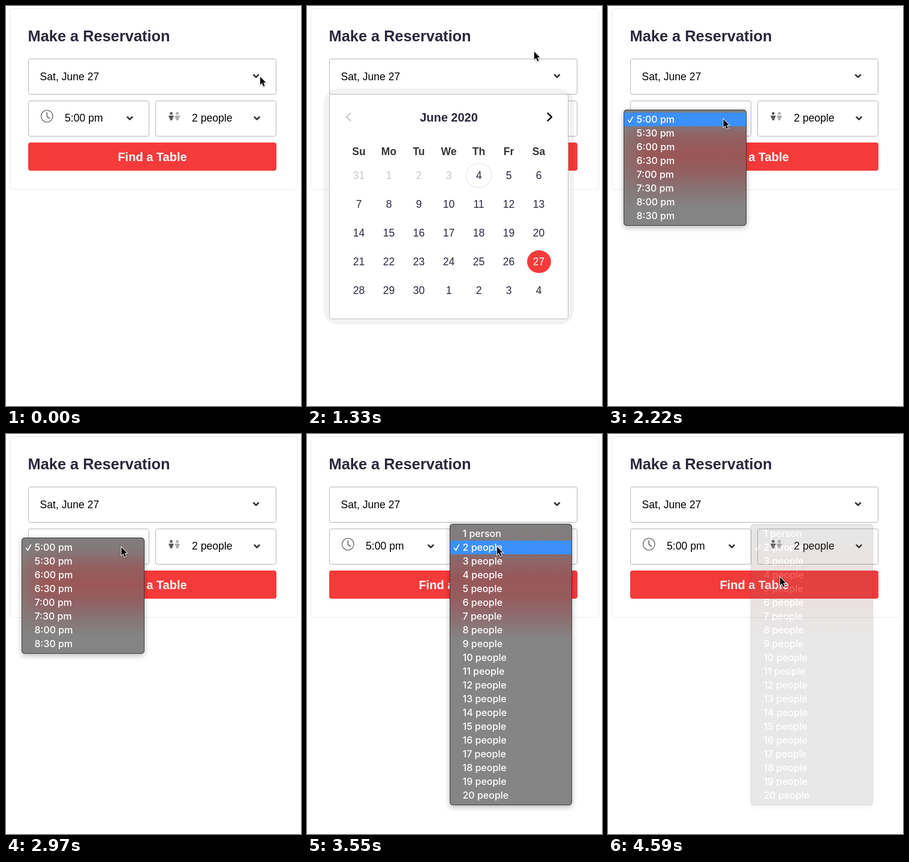
Animation of 492 by 668 pixels, one loop 4.74 s. Source, as an HTML page:

```html
<!DOCTYPE html>
<html lang="en">
<head>
<meta charset="utf-8">
<title>Reservation form</title>
<style>
  html, body { margin: 0; width: 100%; height: 100%; overflow: hidden; background: #fff; }
  svg { display: block; font-family: "Liberation Sans", Arial, sans-serif; }
  text { white-space: pre; }
  .bold { font-weight: 700; }
  .mid { text-anchor: middle; }
  .field { fill: #fff; stroke: #b4b4b4; }
  .line { fill: none; stroke-linecap: round; stroke-linejoin: round; }
  .menu text { font: 500 16px Inter, Roboto, sans-serif; fill: #fff; }
  .panel { filter: drop-shadow(0 3px 5px rgba(0, 0, 0, .28)); }
  .cursor { filter: drop-shadow(0 1px 1px rgba(0, 0, 0, .3)); }
</style>
</head>
<body>
<svg id="stage" width="492" height="668" viewBox="0 0 492 668">
  <defs>
    <linearGradient id="timeGlass" x1="0" y1="173" x2="0" y2="367" gradientUnits="userSpaceOnUse">
      <stop offset="0" stop-color="#7f7f7f"/>
      <stop offset=".12" stop-color="#847677"/>
      <stop offset=".25" stop-color="#935f60"/>
      <stop offset=".4" stop-color="#9b5757"/>
      <stop offset=".54" stop-color="#935f60"/>
      <stop offset=".7" stop-color="#877576"/>
      <stop offset=".85" stop-color="#848484"/>
    </linearGradient>
    <linearGradient id="peopleGlass" x1="0" y1="150" x2="0" y2="620" gradientUnits="userSpaceOnUse">
      <stop offset="0" stop-color="#7f7f7f"/>
      <stop offset=".06" stop-color="#827b7b"/>
      <stop offset=".12" stop-color="#8c6868"/>
      <stop offset=".19" stop-color="#98585a"/>
      <stop offset=".26" stop-color="#975b5d"/>
      <stop offset=".33" stop-color="#8d6d6f"/>
      <stop offset=".41" stop-color="#858585"/>
    </linearGradient>
    <linearGradient id="edge">
      <stop offset="0" stop-color="#828282" stop-opacity=".6"/>
      <stop offset=".18" stop-color="#828282" stop-opacity="0"/>
    </linearGradient>
  </defs>
</svg>
<script>
const LOOP = 4740, INK = '#2a283c', RED = '#f53a3a', BLUE = '#3b90fd';
const stage = document.getElementById('stage');

function add(parent, tag, attrs = {}, text) {
  const el = document.createElementNS('http://www.w3.org/2000/svg', tag);
  for (const key in attrs) el.setAttribute(key, attrs[key]);
  if (text !== undefined) el.textContent = text;
  return parent.appendChild(el);
}
const rect = (p, x, y, width, height, rx, attrs) =>
  add(p, 'rect', { x, y, width, height, rx, ...attrs });
const label = (p, x, y, size, text, fill = '#000', cls = '') =>
  add(p, 'text', { x, y, 'font-size': size, fill, class: cls }, text);
const line = (p, d, stroke, width) =>
  add(p, 'path', { d, stroke, 'stroke-width': width, class: 'line' });

// Holds each value until the next time in the table.
function hold(el, prop, steps) {
  const frames = steps.map(([t, v]) => ({ offset: t / LOOP, [prop]: v, easing: 'step-end' }));
  frames.push({ offset: 1, [prop]: steps[steps.length - 1][1] });
  el.animate(frames, { duration: LOOP, iterations: Infinity });
}

function drawForm() {
  const form = add(stage, 'g');
  rect(form, 6.5, 4.5, 480, 302, 4, { fill: '#fff', stroke: '#ebebeb' });
  label(form, 36.5, 59, 25.4, 'Make a Reservation', INK, 'bold');
  rect(form, 37.5, 88.5, 413, 59, 3, { class: 'field' });
  rect(form, 37.5, 158.5, 201, 59, 3, { class: 'field' });
  rect(form, 249.5, 158.5, 201, 59, 3, { class: 'field' });
  label(form, 56.5, 124, 17.6, 'Sat, June 27');
  label(form, 98, 193, 17.6, '5:00 pm');
  label(form, 310, 193, 17.6, '2 people');
  for (const [x, y] of [[417, 117], [206.5, 187.5], [418.5, 187.5]])
    line(form, `M${x - 4} ${y - 2}l4 4 4-4`, '#333', 2.5);

  add(form, 'circle', { cx: 68.3, cy: 184, r: 9.8, fill: 'none', stroke: '#666', 'stroke-width': 1.3 });
  line(form, 'M68.3 178v6.5l4.2 3.2', '#666', 1.6);
  for (const [x, fill] of [[275.5, '#5c5c5c'], [285.7, '#adadad']]) {
    add(form, 'circle', { cx: x, cy: 179.4, r: 2.4, fill });
    add(form, 'path', { d: `M${x - 4} 183h8q.7 2-1.2 4l-1.3 4h-3l-1.3-4q-1.9-2-1.2-4z`, fill });
  }

  rect(form, 37, 228, 414, 47, 4, { fill: RED });
  label(form, 244, 259, 20, 'Find a Table', '#fff', 'bold mid');
}

function drawCalendar() {
  const cal = add(stage, 'g', { opacity: 0 });
  rect(cal, 28, 138, 417, 394, 24, { fill: '#000', opacity: .05 });
  rect(cal, 37.5, 147.5, 398, 375, 3, { fill: '#fff', stroke: '#bdbdbd' });
  label(cal, 236.5, 193, 20, 'June 2020', INK, 'bold mid');
  line(cal, 'M72.5 179l-6.5 6.3 6.5 6.3', '#ccc', 2.4);
  line(cal, 'M401.5 179l6.5 6.3-6.5 6.3', '#000', 2.4);
  add(cal, 'ellipse', { cx: 286.5, cy: 283, rx: 21.3, ry: 20.3, fill: '#fff', stroke: '#ebebeb', 'stroke-width': 1.6 });
  add(cal, 'ellipse', { cx: 387, cy: 427, rx: 20, ry: 19, fill: RED });

  const colX = i => 86.5 + 50 * (i % 7);
  ['Su', 'Mo', 'Tu', 'We', 'Th', 'Fr', 'Sa'].forEach((d, i) =>
    label(cal, colX(i), 249, 17.5, d, '#333', 'bold mid'));
  for (let i = 0; i < 35; i++) {
    const day = i === 0 ? 31 : i > 30 ? i - 30 : i;
    const fill = i < 4 ? '#c9c9cd' : i === 27 ? '#fff' : INK;
    label(cal, colX(i), 289 + 48 * Math.floor(i / 7), 17.5, day, fill, 'mid');
  }
  hold(cal, 'opacity', [[0, 0], [590, 1], [1630, 0]]);
}

function drawMenu(x, y, width, items, checked, glass) {
  const menu = add(stage, 'g', { class: 'menu', opacity: 0 });
  const height = items.length * 23 + 10;
  rect(menu, x, y, width, height, 5, { fill: `url(#${glass})`, class: 'panel' });
  if (glass === 'timeGlass') rect(menu, x, y, width, height, 5, { fill: 'url(#edge)' });
  const mark = rect(menu, x, y + 5 + 23 * checked, width, 23, 0, { fill: BLUE });
  rect(menu, x + .5, y + .5, width - 1, height - 1, 5, { fill: 'none', stroke: '#3c3c3c' });
  items.forEach((item, i) => add(menu, 'text', { x: x + 21.5, y: y + 22 + 23 * i }, item));
  line(menu, `M${x + 7.5} ${y + 17.5 + 23 * checked}l2.8 3.8 5-9.3`, '#fff', 1.6);
  return { menu, mark };
}

function drawTimes() {
  const items = Array.from({ length: 8 }, (_, i) => `${5 + (i >> 1)}:${i % 2 ? '30' : '00'} pm`);
  const { menu, mark } = drawMenu(26, 173, 205, items, 0, 'timeGlass');
  hold(menu, 'opacity', [[0, 0], [2220, 1], [3110, .19], [3260, 0]]);
  hold(mark, 'opacity', [[0, 1], [2970, 0]]);
}

function drawPeople() {
  const items = Array.from({ length: 20 }, (_, i) => `${i + 1} ${i ? 'people' : 'person'}`);
  const { menu, mark } = drawMenu(238, 150, 204, items, 1, 'peopleGlass');
  hold(menu, 'opacity', [[0, 0], [3550, 1], [4590, .19]]);
  hold(mark, 'opacity', [[0, 1], [4440, 0]]);
  hold(mark, 'transform', [[0, 'translateY(0px)'], [3990, 'translateY(23px)']]);
}

function drawCursor() {
  const cursor = add(stage, 'g', { class: 'cursor' });
  add(cursor, 'path', {
    d: 'M1 1.3V14.4L4 11.6 6.3 17.2 8.5 16.2 6.2 10.8H10.4Z',
    fill: '#000', stroke: '#fff', 'stroke-width': 1.8, 'paint-order': 'stroke'
  });
  const path = [
    [0, 423, 117], [300, 413.5, 113.5], [1180, 412.5, 114], [1330, 378, 75],
    [1480, 377.5, 72.5], [1780, 334, 98], [1930, 198, 194], [2080, 189.5, 190],
    [2220, 191.5, 188], [3110, 316, 187], [3850, 308, 198.5], [3990, 302.5, 209],
    [4140, 302, 211], [4590, 286, 238]
  ];
  hold(cursor, 'transform', path.map(([t, x, y]) => [t, `translate(${x}px, ${y}px)`]));
}

drawForm();
drawCalendar();
drawTimes();
drawPeople();
drawCursor();
</script>
</body>
</html>
```
